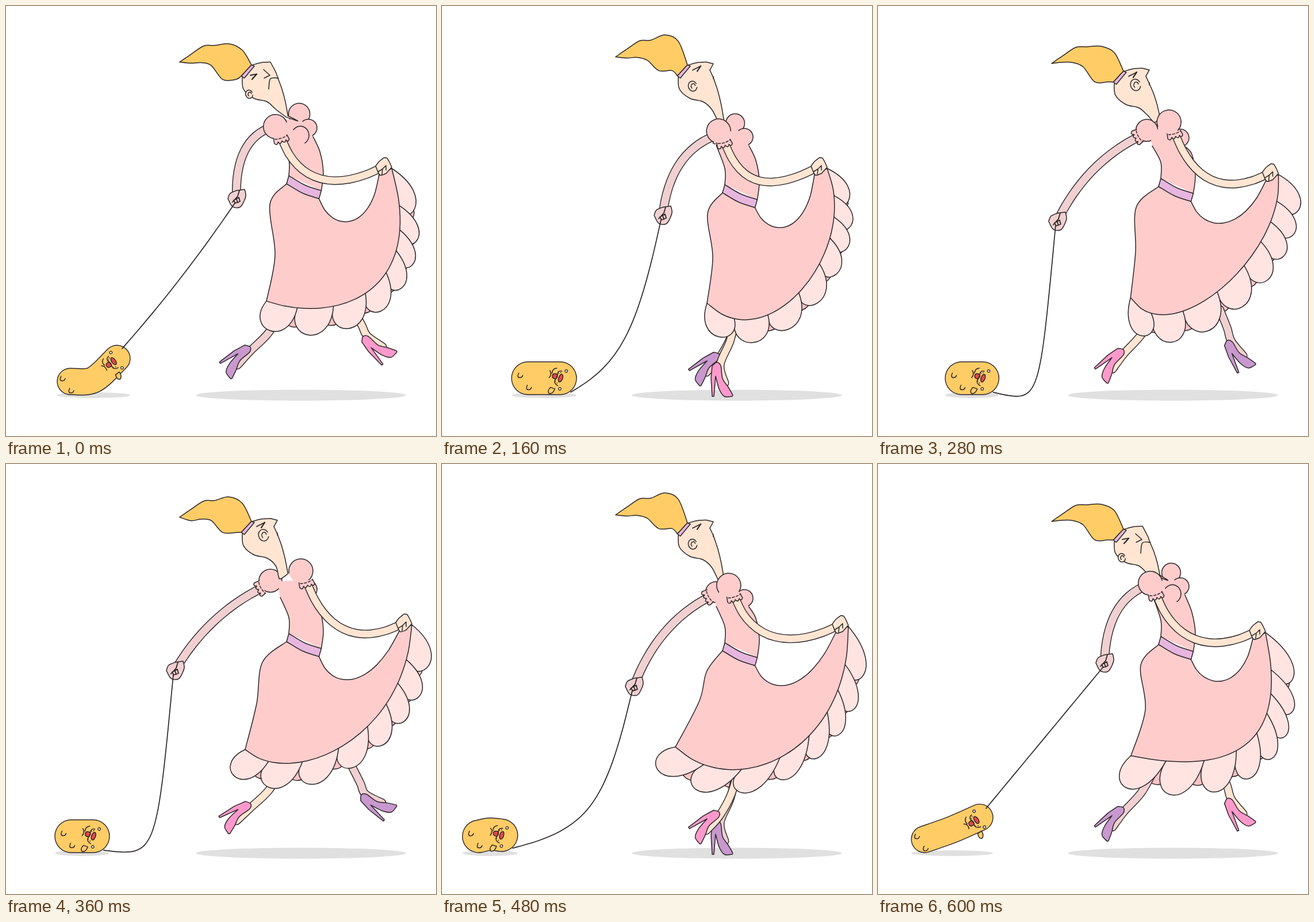
Write an HTML page with a canvas that moves like this. It is 748x748 px and loops after 640 ms.

```html
<!DOCTYPE html>
<html lang="en">
<head>
<meta charset="utf-8">
<title>Walking the pet</title>
<style>
html, body { margin: 0; width: 100%; height: 100%; overflow: hidden; background: #fff; }
canvas { display: block; width: 748px; height: 748px; }
</style>
</head>
<body>
<canvas id="stage" width="748" height="748"></canvas>
<script>
const g = document.getElementById('stage').getContext('2d');
const STEPS = 16, STEP_MS = 40, TAU = 2 * Math.PI, RAD = Math.PI / 180;
const INK = '#2b2628', SKIN = '#ffe5d2', FAR_SKIN = '#f0d0d0', DRESS = '#ffcccc', INNER = '#fbc4c6',
  FRILL = '#ffe4e1', HAIR = '#ffcc66', LILAC = '#e6b6de', GREY = '#e0e0e0', RED = '#e8474c';

// ---- motion: smooth cyclic keys [step, ...values], and cosine waves ----
function track(...keys) {
  const n = keys.length;
  const key = i => {
    const [t, ...v] = keys[(i + n) % n];
    return { t: t + STEPS * Math.floor(i / n), v };
  };
  return time => {
    const t = time % STEPS;
    let i = n - 1;
    while (i >= 0 && keys[i][0] > t) i--;
    const [a, b, c, d] = [-1, 0, 1, 2].map(o => key(i + o));
    const h = c.t - b.t, s = (t - b.t) / h, s2 = s * s, s3 = s2 * s;
    return b.v.map((p, k) => {
      const m0 = (c.v[k] - a.v[k]) / (c.t - a.t), m1 = (d.v[k] - p) / (d.t - b.t);
      return (2 * s3 - 3 * s2 + 1) * p + (s3 - 2 * s2 + s) * h * m0 +
        (3 * s2 - 2 * s3) * c.v[k] + (s3 - s2) * h * m1;
    });
  };
}
const wave = (t, peak, period = STEPS) => Math.cos(TAU * (t - peak) / period);
const STRIDE = STEPS / 2;

const handX = track([0, 657], [4, 656], [6, 676], [9, 692], [11, 692], [13, 690], [15, 660]);
const farShoulder = track([0, 464, 210], [4, 474, 226], [6, 460, 232], [9, 444, 216],
  [11, 454, 224], [13, 473, 235], [15, 468, 211]);
const farHand = track([0, 401, 335], [4, 384, 364], [6, 328, 380], [9, 294, 359],
  [11, 313, 371], [13, 357, 395], [15, 394, 346]);
// hip x, knee x, hem corner x
const side = track([0, 459, 468, 453], [4, 462, 471, 461], [6, 453, 456, 450], [9, 446, 436, 416],
  [11, 465, 448, 401], [13, 454, 448, 416], [15, 457, 465, 440]);
// the two control points of the hem
const hemPull = track([0, 575, 555, 735, 500], [4, 565, 620, 730, 425], [6, 517, 627, 717, 415],
  [9, 496, 567, 695, 480], [11, 502, 614, 690, 450], [13, 523, 557, 730, 553], [15, 584, 537, 724, 516]);
// petal direction at both ends of the hem, petal length
const fan = track([0, 115, 48, 50], [4, 95, 46, 45], [6, 72, 44, 52], [9, 137, 50, 53],
  [11, 150, 50, 56], [13, 155, 72, 64], [15, 127, 48, 64]);
// both feet share this path, half a cycle apart: x, y, shoe angle
const foot = track([1, 614, 583, -48], [3, 546, 622, -20], [4, 470, 622, 0], [6, 427, 600, 41],
  [9, 420, 585, 61], [11, 438, 596, 67], [12, 476, 600, 56], [13, 527, 603, 13], [15, 601, 587, -25]);
// left, right, head lift, belly sag, leash slack
const pet = track([0, 89, 216, 40, 17, 0.05], [4, 121, 234, 0, 0, 0.45], [6, 128, 223, 0, 0, 1],
  [9, 85, 180, 0, 0, 1], [11, 54, 148, 0, 0, 0.6], [13, 18, 118, 6, -5, 0.5],
  [14, 9, 117, 17, 0, 0.05], [15, 58, 200, 38, 2, 0]);

// Everything the parts need to know about step t
function poseAt(t) {
  const bob = 106.5 + 9.5 * wave(t, 6, STRIDE) + 4 * wave(t, 6, STRIDE / 2);
  const waist = 303 + 11 * wave(t, 5, STRIDE) + 3 * wave(t, 5, STRIDE / 2);
  const far = farShoulder(t), chest = far[1], twist = wave(t, 9), turn = wave(t, 8);
  return {
    t, bob, waist, far, chest, twist, turn,
    profile: Math.min(1, Math.max(0, 1 + 1.5 * turn)),
    tip: 93 + 7 * wave(t, 6.9, STRIDE),
    neck: 195 + (waist - 303) / 2,
    puff: [490 + 23 * twist, chest - 14.5 - 15.5 * twist],
    hand: [handX(t)[0], bob + 177],
    farHand: farHand(t),
    belt: [[492, waist], [548.5, waist + 26], [544.5, waist + 40], [488, waist + 14]]
  };
}

// ---- drawing helpers ----
const mix = (a, b, k) => a.map((v, i) => v + (b[i] - v) * k);
const add = (p, x, y) => [p[0] + x, p[1] + y];
const bezier = (a, b, c, d, s) => mix(mix(mix(a, b, s), mix(b, c, s), s), mix(mix(b, c, s), mix(c, d, s), s), s);
const arc = (a, b, c, d, n = 8) => Array.from({ length: n + 1 }, (_, i) => bezier(a, b, c, d, i / n));

// Smooth runs of points joined by corners
function path(...runs) {
  const p = new Path2D();
  runs.forEach((r, j) => {
    p[j ? 'lineTo' : 'moveTo'](...r[0]);
    for (let i = 0; i < r.length - 1; i++) {
      const a = r[i - 1] || r[i], b = r[i], c = r[i + 1], d = r[i + 2] || c;
      p.bezierCurveTo(b[0] + (c[0] - a[0]) / 6, b[1] + (c[1] - a[1]) / 6,
        c[0] - (d[0] - b[0]) / 6, c[1] - (d[1] - b[1]) / 6, c[0], c[1]);
    }
  });
  return p;
}
function line(p, w = 1.5) { g.strokeStyle = INK; g.lineWidth = w; g.stroke(p); }
function fill(p, color) { g.fillStyle = color; g.fill(p); }
function shape(p, color) { p.closePath(); fill(p, color); line(p); }
function limb(pts, w, color) {
  const p = path(pts);
  line(p, w + 2.8);
  g.strokeStyle = color; g.lineWidth = w; g.stroke(p);
}
function oval(x, y, rx, ry = rx, turn = 0, from = 0, to = TAU) {
  const p = new Path2D();
  p.ellipse(x, y, rx, ry, turn, from, to);
  return p;
}
function local([x, y], deg, draw) {
  g.save(); g.translate(x, y); g.rotate(deg * RAD); draw(); g.restore();
}
const turned = ([x, y], deg) => {
  const c = Math.cos(deg * RAD), s = Math.sin(deg * RAD);
  return (u, v) => [x + u * c - v * s, y + u * s + v * c];
};

// ---- pet and leash ----
function drawPet({ t, farHand }) {
  const [left, right, lift, sag, slack] = pet(t), w = 57 - lift * 0.28, deg = 110 - lift * 1.4;
  const base = 676 - w / 2, tail = [left + w / 2, base], head = [right - w / 2, base - lift];
  const mid = add(mix(tail, head, 0.5), 0, sag);
  const eye = turned(add(head, 5 - lift * 0.15, 3), deg)(-16.5, 0);
  fill(oval((left + right) / 2, 677, (right - left) / 2, 5), GREY);
  local(eye, deg, () => {
    shape(new Path2D('M0 -15 Q2 -23 7 -18 L9 -12'), HAIR);
    shape(new Path2D('M25 -13 Q30 -22 33 -15 L32 -10'), HAIR);
  });
  limb([tail, mid, head], w - 1.4, HAIR);
  for (const [dx, dy] of [[-16, -9], [-1, 12]])
    line(new Path2D(`M${tail[0] + dx} ${tail[1] + dy} q-4 8 2 8 q4 0 5 -4`));
  local(eye, deg, () => {
    shape(new Path2D('M36 8 Q45 8 47 14 Q45 20 36 16'), HAIR);
    for (const u of [0, 33]) { fill(oval(u, 0, 2.2), '#fff'); line(oval(u, 0, 2.2), 1.3); }
    line(new Path2D('M3 7 Q4 16 15 11 Q27 17 29 5 M9 27 Q13 21 21 24 M1 17 Q4 24 12 22'));
    shape(new Path2D('M11 12 Q10 21 16 20 Q21 19 19 12 Z'), RED);
    shape(oval(15, 5, 7, 3.4), RED);
    for (const [u, n] of [[6, 8], [8, 11], [25, 8], [23, 12]]) fill(oval(u, n, 0.9), INK);
  });
  const from = add(farHand, -3, 8), to = turned(eye, deg)(32 - lift * 0.65, -20);
  const low = [from[0] - 30, to[1] + 11];
  return path(arc(from, mix(mix(from, to, 1 / 3), low, slack), mix(mix(from, to, 2 / 3), low, slack), to));
}

// ---- limbs ----
function drawFarArm({ far, farHand, twist }, leash) {
  const bow = 34 + 0.22 * (farHand[0] - 310);
  const bend = add(mix(far, farHand, 0.5), -0.65 * bow, -0.76 * bow);
  limb(arc(far, mix(far, bend, 2 / 3), mix(farHand, bend, 2 / 3), farHand), 13, FAR_SKIN);
  local(farHand, 0, () => {
    shape(path([[-15, 0], [-11, -9], [0, -14]], [[14, -16], [16, -4], [9, 12], [2, 16], [-8, 13], [-15, 0]]), FAR_SKIN);
    line(new Path2D('M5 -14 L2 -4 L-7 6 M-5 3 L4 -2 L6 5 L-2 8 Z M0 1 L2 7'), 1.8);
  });
  line(leash, 1.7);
  shape(oval(far[0] + 10 + 6 * twist, far[1] - 6 - 7 * twist, 17 + 3 * twist), DRESS);
  frill(far, 62);
}

function frill(at, deg) {
  local(at, deg, () => {
    const p = new Path2D('M-13 -3 L-14 6 Q-10 12 -7 5 Q-4 12 0 5 Q4 12 7 5 Q10 11 13 5 L11 -3');
    fill(p, DRESS);
    line(p);
    g.setLineDash([4, 3]);
    line(new Path2D('M-11 -1 Q0 2 11 -2'));
    g.setLineDash([]);
  });
}

function drawArm({ hand, puff, twist }) {
  const s = add(puff, 12, 24);
  limb(arc(s, add(s, 28, 72), add(hand, -85, 45), hand), 12, SKIN);
  local(hand, 0, () => {
    shape(path([[-14, -1], [-8, -9], [1, -16]], [[6, -15], [10, -8], [14, 1]], [[4, 12], [-6, 15], [-10, 9]]), SKIN);
    line(new Path2D('M-10 9 L-2 4 L4 -2 M-2 4 L-3 13 M4 -2 L4 6'));
  });
  fill(oval(...puff, 21), DRESS);
  line(oval(...puff, 21, 21, 0, (130 + 40 * twist) * RAD, (375 + 40 * twist) * RAD));
  frill(add(puff, 10, 20), -15);
}

function drawLeg(t, skin, shoe) {
  const [x, y, deg] = foot(t), at = turned([x, y], deg);
  const hip = [0.62 * x + 222, 528], ankle = at(14, 2);
  limb([hip, add(mix(hip, ankle, 0.5), 3, 5), ankle, at(22, 34)], 12, skin);
  local([x, y], deg, () => shape(path(
    [[0, 4], [8, -2], [15, 4], [18, 26], [28, 41], [36, 55]],
    [[35, 57], [21, 57], [12, 44], [6, 22]],
    [[3, 57], [0, 57]], [[-2, 25], [0, 4]]), shoe));
}

// ---- dress ----
function petal(a, b, tip, color) {
  const m = mix(a, b, 0.5), d = [tip[0] - m[0], tip[1] - m[1]], len = Math.hypot(...d);
  const end = add(m, d[0] * 4 / 3, d[1] * 4 / 3), wx = d[1] / len * 42, wy = -d[0] / len * 42;
  const p = new Path2D();
  p.moveTo(...a);
  p.bezierCurveTo(end[0] - wx, end[1] - wy, end[0] + wx, end[1] + wy, ...b);
  fill(p, color);
  line(p);
}

function drawSkirt({ t, waist, belt, hand }) {
  const [hip, knee, corner] = side(t), [ax, ay, bx, by] = hemPull(t), [start, stop, len] = fan(t);
  const low = [corner, 490 + 0.45 * (corner - 401)], top = add(hand, 14, 3);
  const hem = s => bezier(low, [ax, ay], [bx, by], top, s);
  const PETALS = 8;
  const notch = Array.from({ length: PETALS + 1 }, (_, i) => {
    const u = i / PETALS;
    return hem(u + 0.12 * Math.sin(Math.PI * u) ** 2);
  });
  const tips = Array.from({ length: PETALS }, (_, i) => {
    const dir = (stop + (start - stop) * (1 - i / (PETALS - 1)) ** 1.3) * RAD;
    return add(mix(notch[i], notch[i + 1], 0.5), len * Math.cos(dir), len * Math.sin(dir));
  });
  for (let i = 1; i < PETALS; i++)
    petal(mix(notch[i], notch[i - 1], 0.25), mix(notch[i], notch[i + 1], 0.25),
      mix(notch[i], mix(tips[i - 1], tips[i], 0.5), 0.75), INNER);
  drawLeg(t + STRIDE, FAR_SKIN, '#c998ce');
  drawLeg(t, SKIN, '#ff99cc');
  for (let i = PETALS - 1; i >= 0; i--) petal(notch[i], notch[i + 1], tips[i], FRILL);

  const [, , right, left] = belt, lap = add(hand, -8, 14);
  const dip = (8 * (379 + 0.6 * (waist - 303)) - lap[1] - right[1]) / 6;
  shape(path([left, [hip, waist + 50], [knee, low[1] - 80], low],
    arc(low, [ax, ay], [bx, by], top, 12),
    arc(lap, [635, dip], [565, dip], right)), DRESS);
}

function drawBody({ t, chest, waist, belt, turn }) {
  const [wl, wr, br, bl] = belt;
  shape(oval(510, chest - 22, 12 + 8 * wave(t, 1.5)), DRESS);
  shape(oval(526, chest + 2, 15), DRESS);
  const left = [[477, chest + 16], [492, waist - 28], wl];
  const right = [wr, [552, waist - 6], [546, waist - 42], [534, chest + 17]];
  fill(path([[474, chest - 12], ...left], [...right, [512, chest - 14]]), DRESS);
  line(path(left));
  line(path(right));
  if (turn < -0.6) line(oval(512, chest + 15, 15, 16, 0, -2.5, 1));
  const sag = (p, q) => add(mix(p, q, 0.5), -1, 3);
  shape(path([wl, sag(wl, wr), wr], [br, sag(br, bl), bl]), LILAC);
}

// ---- head ----
function drawHead({ t, bob, neck, turn, profile, tip }) {
  const at = (x, y) => [427 + x, bob + y];
  const look = (x0, y0, x1, y1) => mix(at(x0, y0), at(x1, y1), profile);
  const nose = look(40, 8, 45, -2), under = look(43, 14, 39, 9), lip = look(46, 23, 45, 22);
  const front = [490.5, neck], collar = [493 + 16 * wave(t, 1), neck + 9], nape = [480 + 7 * wave(t, 0), neck + 2];
  shape(path([at(2, 0), at(17, -4), at(33, -5)], [nose], [under], [lip],
    [lip, add(mix(lip, front, 0.3), 2, 0), add(mix(lip, front, 0.62), 2, 0), front],
    [front, collar, nape],
    [nape, at(42, 77), at(27, 64), at(4, 58), at(-14, 42), at(-16, 20)]), SKIN);

  const lid = look(9, 16, 23, 2);
  line(path([look(-2, 18, 9, 9), lid]), 1.8);
  line(path([lid], [look(1, 25, 17, 11)]), 2.2);
  line(path([look(21, 8, 39, 9)], [look(32, 18, 39, 9)], [look(22, 23, 39, 9)]));
  line(path([look(47, 23, 45, 20), look(33, 24, 45, 23), look(30, 42, 45, 24)]));

  const [x, y] = at(9 + 13 * turn, 37 - 14 * turn), r = 8.8 + 1.5 * turn;
  const ear = oval(x, y, r * 0.85, r, -0.3, 0.5, 6);
  fill(ear, SKIN);
  line(ear);
  line(oval(x + 1, y, r * 0.4, r * 0.5, 0, 2.2, 6));

  // ponytail: tip and crown swing, the lower edge ripples
  const crown = 1.7 * tip - 100, ripple = 6 * Math.sin(TAU * t / STRIDE);
  const end = [302, tip], top = at(0, 0), low = at(-17.5, 19);
  shape(path([end, [321, tip - 13], [344, tip - 28], [363, tip - 29], [388, crown], [411, crown + 11], top],
    [low, [400, crown + 62], [377, crown + 62], [357, tip + 6], [339, tip + 1 + ripple * 0.6], [322, tip + 2 + ripple], end]), HAIR);
  shape(path([low], [top], [add(top, 5, 2)], [add(low, 5, 4)]), LILAC);
}

function draw() {
  const pose = poseAt(Math.floor(performance.now() / STEP_MS) % STEPS);
  g.fillStyle = '#fff';
  g.fillRect(0, 0, 748, 748);
  g.lineCap = g.lineJoin = 'round';
  fill(oval(513, 677, 183, 9.5), GREY);
  const leash = drawPet(pose);
  drawFarArm(pose, leash);
  drawSkirt(pose);
  drawBody(pose);
  drawHead(pose);
  drawArm(pose);
  requestAnimationFrame(draw);
}
draw();
</script>
</body>
</html>
```
